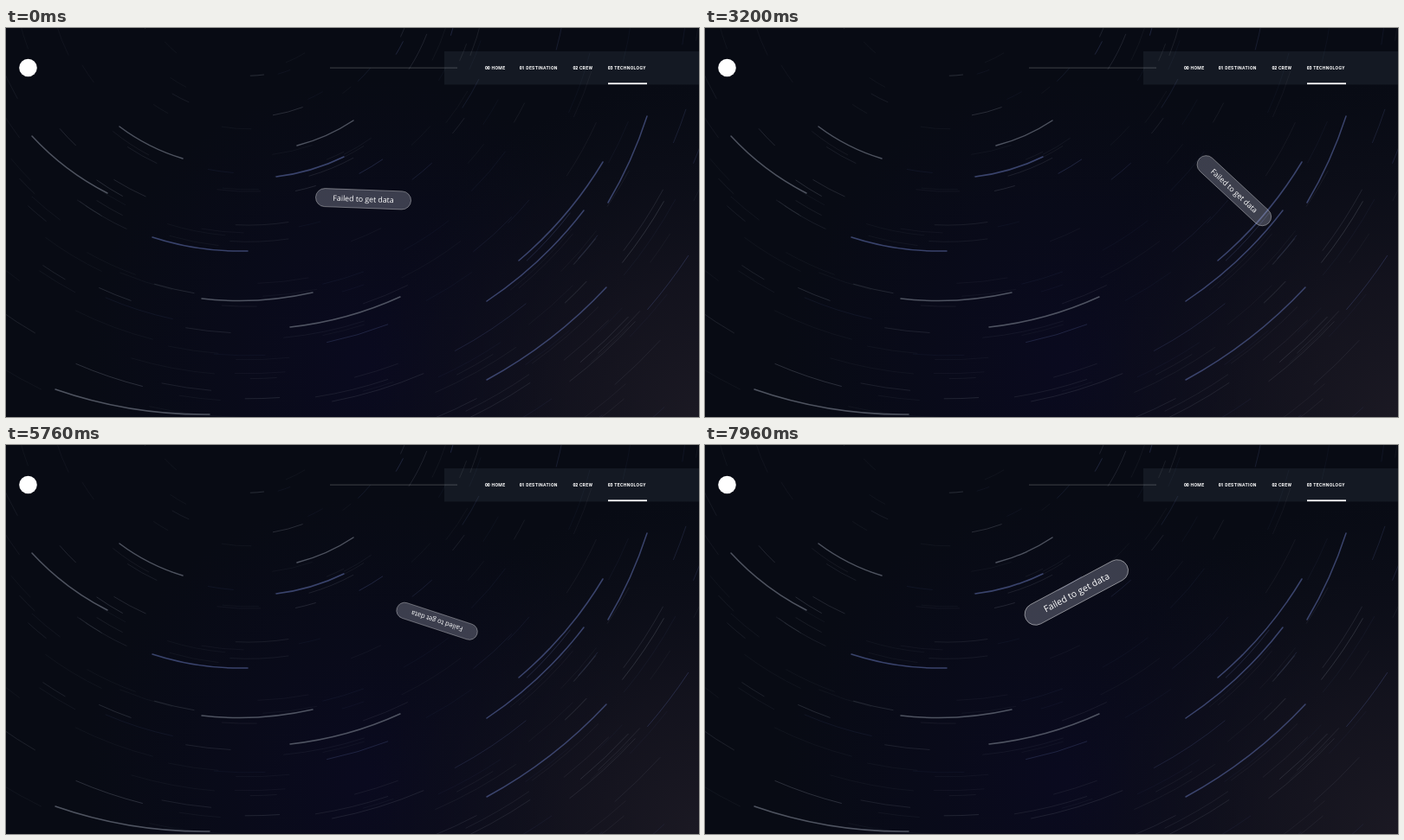
An HTML page that plays this animation: 800x450 px, repeating every 8 s.

```html
<!DOCTYPE html>
<html lang="en">
<head>
<meta charset="utf-8">
<title>Failed to get data</title>
<style>
  html, body { margin: 0; width: 100%; height: 100%; overflow: hidden; background: #080b14; }
  svg { display: block; width: 100vw; height: 100vh; }
  .nav { font: 600 5.15px Roboto, sans-serif; letter-spacing: .35px; fill: #fff; }
  .num { font-weight: 900; letter-spacing: -.3px; }
  .msg { font: 500 8.75px "Open Sans", "Noto Sans", sans-serif; fill: #fff; text-anchor: middle; }
</style>
</head>
<body>
<svg viewBox="0 0 800 450">
  <defs>
    <radialGradient id="blue" gradientUnits="userSpaceOnUse" cx="420" cy="390" r="330">
      <stop offset="0" stop-color="#0a0a1f"/>
      <stop offset="1" stop-color="#0a0a1f" stop-opacity="0"/>
    </radialGradient>
    <radialGradient id="dusk" gradientUnits="userSpaceOnUse" cx="800" cy="450" r="390">
      <stop offset="0" stop-color="#1b1923"/>
      <stop offset=".4" stop-color="#15141f" stop-opacity=".85"/>
      <stop offset="1" stop-color="#0e0f1c" stop-opacity="0"/>
    </radialGradient>
  </defs>
  <rect width="800" height="450" fill="#080b14"/>
  <rect width="800" height="450" fill="url(#blue)"/>
  <rect width="800" height="450" fill="url(#dusk)"/>
  <g id="sky" fill="none" stroke-linecap="round"></g>

  <rect x="506" y="27" width="294" height="38.5" fill="#c4e0ec" opacity=".065"/>
  <rect x="374" y="45.6" width="147" height="1" fill="#fff" opacity=".22"/>
  <circle cx="25.5" cy="46" r="10.3" fill="#fff"/>
  <g id="nav" class="nav"></g>
  <rect x="695" y="63.4" width="45" height="1.8" fill="#fff"/>

  <g id="pill">
    <rect x="-55" y="-10.5" width="110" height="21" rx="10.5" fill="#e4e8ff" fill-opacity=".23"
          stroke="#fff" stroke-opacity=".5" stroke-width=".7"/>
    <text class="msg" y="3.2">Failed to get data</text>
  </g>
</svg>
<script>
const NS = 'http://www.w3.org/2000/svg';
const $ = id => document.getElementById(id);

function add(parent, tag, attrs, text) {
  const el = document.createElementNS(NS, tag);
  for (const k in attrs) el.setAttribute(k, attrs[k]);
  if (text) el.textContent = text;
  parent.appendChild(el);
}

// Star trails: arcs bent around one pole above the stage
const POLE = { x: 280, y: -72 };
const BLUE = '#4a5688', GREY = '#666b78';

function trail(x1, y1, x2, y2, stroke, width, opacity) {
  const r = Math.hypot((x1 + x2) / 2 - POLE.x, (y1 + y2) / 2 - POLE.y);
  add($('sky'), 'path', {
    d: `M${x1} ${y1}A${r} ${r} 0 0 0 ${x2} ${y2}`,
    stroke, 'stroke-width': width, opacity
  });
}

let seed = 11;
const rand = () => (seed = (seed * 16807) % 2147483647) / 2147483647;

for (let i = 0; i < 300; i++) {
  const r = 70 + 660 * rand() ** .6;
  const a = .05 + rand() * 3;
  const b = a - (.06 + rand() * .16);
  const at = q => [POLE.x + r * Math.cos(q), POLE.y + r * Math.sin(q)];
  // Trails turn bluer towards the right
  const color = rand() < .65 - a / 4 ? BLUE : GREY;
  trail(...at(a), ...at(b), color, .9, .1 + .35 * rand() ** 3);
}

const glow = (color, trails) => trails.forEach(s => trail(...s, color, 1.5, .75));
glow(BLUE, [
  [312, 172, 390, 149], [169, 242, 279, 258], [555, 316, 667, 211],
  [592, 269, 689, 155], [555, 407, 693, 300], [695, 202, 740, 102]
]);
glow(GREY, [
  [30, 125, 117, 191], [131, 114, 204, 151], [336, 136, 401, 107],
  [226, 313, 354, 306], [328, 346, 455, 311], [57, 418, 235, 447]
]);

const links = [[553, 'HOME'], [592.8, 'DESTINATION'], [654.5, 'CREW'], [694.8, 'TECHNOLOGY']];
links.forEach(([x, label], i) => {
  add($('nav'), 'text', { x, y: 48, class: 'num' }, '0' + i);
  add($('nav'), 'text', { x: x + 7.4, y: 48 }, label);
});

// CSS "ease": cubic-bezier(.25, .1, .25, 1)
function ease(p) {
  const bez = (u, a, b) => 3 * a * u * (1 - u) ** 2 + 3 * b * u * u * (1 - u) + u ** 3;
  let lo = 0, hi = 1;
  for (let i = 0; i < 24; i++) {
    const mid = (lo + hi) / 2;
    if (bez(mid, .25, .25) < p) lo = mid; else hi = mid;
  }
  return bez(lo, .1, 1);
}

// Drift poses: share of the cycle, x, y, angle, scale
const CYCLE = 9000, BEGIN = 427, LOOP = 8000, STEP = 40;
const rest = [412, 204, 12, .955];
const poses = [
  [0, ...rest],
  [.1, 75, 205, -20, .727],
  [.3, 624, 188, 40, 1],
  [.5, 91, 196.5, 160, .74],
  [.7, 624, 206, 210, .93],
  [.9, 415, 168, -45, 1.22],
  [1, ...rest]
];

function draw(t) {
  const p = (t - BEGIN + CYCLE) % CYCLE / CYCLE;
  const i = poses.findIndex(k => k[0] > p);
  const a = poses[i - 1], b = poses[i];
  const e = ease((p - a[0]) / (b[0] - a[0]));
  const [, x, y, angle, scale] = a.map((v, n) => v + (b[n] - v) * e);
  $('pill').setAttribute('transform', `translate(${x} ${y}) rotate(${angle}) scale(${scale})`);
}

const start = performance.now();
function tick() {
  const t = (performance.now() - start) % LOOP;
  draw(Math.floor(t / STEP) * STEP);
  requestAnimationFrame(tick);
}
tick();
</script>
</body>
</html>
```
